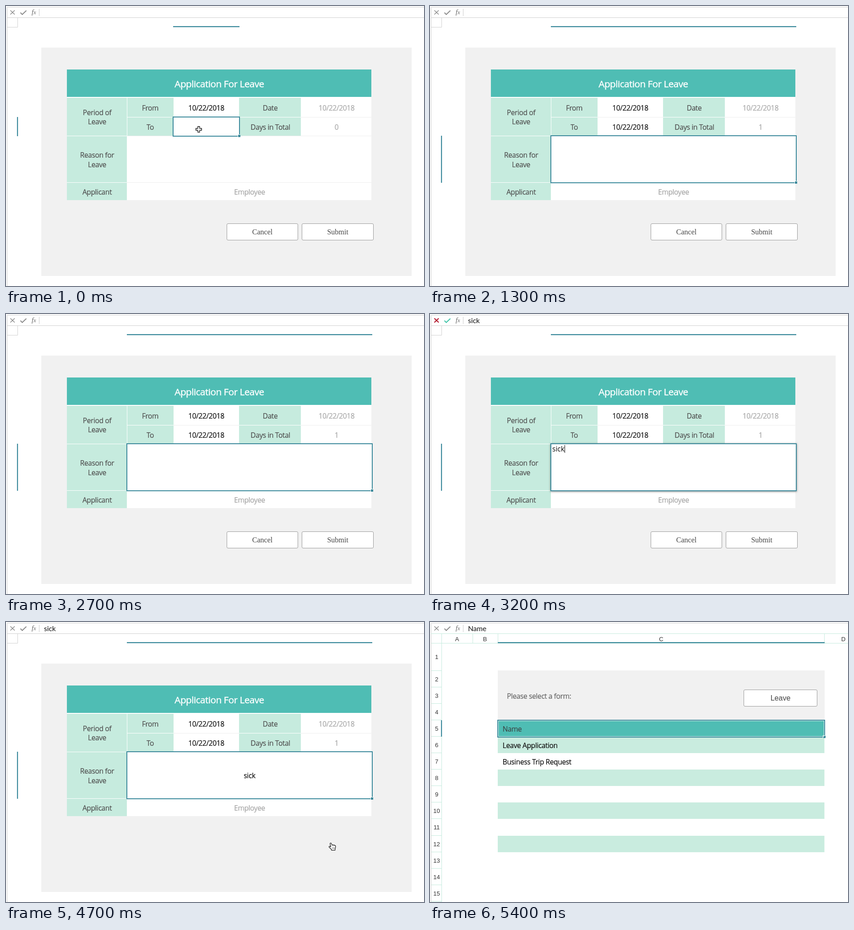
Animation, 913 px wide and 613 px high, one loop 5.5 s. Source, as an HTML page:

```html
<!DOCTYPE html>
<html lang="en">
<head>
<meta charset="utf-8">
<title>Leave form</title>
<style>
  html, body { margin: 0; width: 100%; height: 100%; overflow: hidden; background: #fff; }
  svg { display: block; width: 913px; height: 613px; }
  text { white-space: pre; }
  .cell { font: 15.5px "Open Sans", sans-serif; letter-spacing: -.025em; stroke: currentColor; stroke-width: .2px; }
  .title { font: 20.7px "Open Sans", sans-serif; letter-spacing: -.025em; stroke: currentColor; stroke-width: .4px; }
  .edit { font: 15.5px "Open Sans", sans-serif; }
  .bar { font: 15.5px Lato, sans-serif; }
  .head { font: 13px "Liberation Sans", Arial, sans-serif; }
  .sans { font: 16px "Liberation Sans", Arial, sans-serif; }
  .serif { font: 16px "Liberation Serif", Times, serif; }
  .fx { font: italic 15px "Liberation Serif", Times, serif; }
  .editing { filter: drop-shadow(0 1px 2px rgba(0, 0, 0, .45)); }
</style>
</head>
<body>
<svg id="stage" viewBox="0 0 913 613"></svg>
<script>
const LOOP = 5500;
const TEAL = '#4fbdb4', MINT = '#c6ebde', PANEL = '#f1f1f1', SELECT = '#3c8a9c', LABEL = '#505050', MUTED = '#a6a6a6';
const stage = document.getElementById('stage');

// Rectangles are given by their edges.
const box = (x1, y1, x2, y2, fill, extra = '') =>
  `<rect x="${x1}" y="${y1}" width="${x2 - x1}" height="${y2 - y1}" fill="${fill}" ${extra}/>`;
const path = (d, stroke, width = 1, fill = 'none', extra = '') =>
  `<path d="${d}" stroke="${stroke}" stroke-width="${width}" fill="${fill}" ${extra}/>`;
const text = (str, x, y, kind = 'cell', color = LABEL, anchor = 'middle', id = '') =>
  `<text x="${x}" y="${y}" class="${kind}" fill="${color}" color="${color}" text-anchor="${anchor}" ${id && `id="${id}"`}>${str}</text>`;
const button = (label, x1, y1, x2, y2, kind) =>
  box(x1 + .5, y1 + .5, x2 - .5, y2 - .5, '#fff', 'rx="2.5" stroke="#9a9a9a"') +
  text(label, (x1 + x2) / 2, (y1 + y2) / 2 + 5, kind, '#444');

function selection(x1, y1, x2, y2, editing, fill = '#fff') {
  const frame = box(x1, y1, x2, y2, fill, `stroke="${SELECT}" stroke-width="2" ${editing ? 'class="editing"' : ''}`);
  const handle = box(x2 - 4, y2 - 4, x2 + 2, y2 + 2, '#fff') + box(x2 - 3, y2 - 3, x2 + 2, y2 + 2, SELECT);
  return frame + (editing ? '' : handle);
}

// Markers along the column and row headers.
const markers = (x1, y1, x2, y2) => box(x1, 44, x2, 46.3, SELECT) + box(24, y1, 26.2, y2, SELECT);

const formulaBar = (content, editing, line) =>
  path('M2.5 613V3.5', '#cfcfcf') + path('M2 2.5H913', '#d2d2d2') + path('M2 25.5H913', line) +
  path('M9.5 9.5l9.5 9M19 9.5l-9.5 9', editing ? '#b01028' : '#8c8c8c', editing ? 2 : 1.6) +
  path('M31.5 14.5l4 4 9-8.5', editing ? '#3fc4a8' : '#8c8c8c', 2) +
  text('f<tspan font-size="12">x</tspan>', 56, 18, 'fx', '#666', 'start') +
  path('M72.5 6V22', '#ccc') + text(content, 83, 19.5, 'bar', '#111', 'start');

const plus = (x, y) =>
  path('M-2-6.3h4v4.3h4.3v4h-4.3v4.3h-4v-4.3h-4.3v-4h4.3z', '#222', 1.4, '#fff', `transform="translate(${x} ${y})"`);
const hand = (x, y) => `<g transform="translate(${x} ${y})">` +
  path('M-4-6c-1-2 1.6-3 2.6-1.2l2 4.2c.3-1.6 2.4-1.6 2.8 0 .6-1.2 2.4-.8 2.6.4 1-.6 1.8.2 1.8 1.2 0 2.6.2 4-1 6v3H-1.2V5.8L-6 1.2c-1.4-1.8.6-3 2-1.8l1.4 1z', '#222', 1.3, '#fff', 'stroke-linejoin="round"') +
  path('M1 1.5v3M3 1.5v3M5 1.5v3', '#444', .8) + '</g>';

function leaveForm(t) {
  const dated = t >= 1300, edit2 = t >= 2900 && t < 3600, reason = t >= 3600;
  const edit1 = t >= 300 && !dated;
  const formula = '=today()'.slice(0, Math.max(0, Math.floor((t - 300) / 100)));
  const word = 'sick'.slice(0, Math.max(0, Math.floor((t - 2800) / 100)));
  const typed = edit1 ? formula : word;
  const area = dated ? [264, 284, 800, 387] : [365, 243, 510, 285];
  const mintCells = [[133, 201, 264, 284], [133, 285, 264, 386], [133, 387, 264, 425],
    [265, 201, 366, 243], [265, 244, 366, 284], [509, 201, 644, 243], [509, 244, 644, 284]];
  const value = (str, x, y, color = '#111') => text(str, x, y, 'cell', color);

  let out = formulaBar(typed, edit1 || edit2, '#cfcfcf') + path('M3 46.5H25.5V26', '#d2d2d2') +
    markers(...area) +
    box(77, 91, 886, 591, PANEL) + box(133, 139, 798, 425, '#fff') + box(133, 139, 798, 199, TEAL) +
    mintCells.map(c => box(...c, MINT)).join('') +
    path('M366 243.5H509M644 243.5H798M264 284.5H798M264 386.5H798', '#eee') +
    text('Application For Leave', 466, 178, 'title', '#fff') +
    text('Period of', 199, 238.5) + text('Leave', 199, 259) +
    text('Reason for', 199, 332) + text('Leave', 199, 352.5) + text('Applicant', 199, 412.5) +
    text('From', 315, 228.5) + text('To', 315, 270.5) + text('Date', 577, 228.5) + text('Days in Total', 577.5, 270.5) +
    value('10/22/2018', 437.5, 228.5) + value('10/22/2018', 722, 228.5, MUTED) +
    value(dated ? 1 : 0, 722, 270.5, MUTED) + value('Employee', 532, 412.5, MUTED);

  if (dated) out += value('10/22/2018', 437.5, 270.5);
  if (t < 4600) out += button('Cancel', 482, 476, 638, 513, 'serif') + button('Submit', 646, 476, 803, 513, 'serif');
  out += selection(...area, edit1 || edit2);
  if (edit1 || edit2) out += text(typed, area[0] + (edit1 ? 4 : 3), area[1] + 17, 'edit', '#111', 'start', 'typed');
  if (reason) out += value('sick', 532, 341.5);

  if (t < 100) out += plus(421, 270);
  if (t >= 4200) {
    const p = Math.min(1, (t - 4200) / 300), ease = p * (2 - p);
    const x = 640 + 72 * ease, y = 440 + 52 * ease;
    out += x > 646 && y > 476 ? hand(x, y) : plus(x, y);
  }
  return out;
}

function formList(t) {
  const rowEdge = row => row < 2 ? 46 + 60 * (row - 1) : 106.5 + 36.1 * (row - 2);
  let out = formulaBar('Name', false, MINT) +
    path('M3 46.5H913M25.5 26V613M93.5 26V46M148.5 26V46M861.5 26V46', MINT) +
    [['A', 59], ['B', 120], ['C', 505], ['D', 903]].map(([s, x]) => text(s, x, 41.5, 'head', '#333')).join('');
  for (let row = 1; row <= 15; row++) {
    const bottom = Math.round(rowEdge(row + 1));
    out += path(`M3 ${bottom - .5}H26`, MINT) +
      text(row, 14.5, Math.round((rowEdge(row) + rowEdge(row + 1)) / 2) + 4.5, 'head', '#333');
    if (row >= 6 && row <= 12 && row % 2 === 0) out += box(148, bottom - 36, 861.5, bottom, '#c9ecdf');
  }
  out += markers(148, 215, 862, 251) + box(148, 106, 862, 215, PANEL) +
    text('Please select a form:', 168, 167.5, 'cell', '#666', 'start') +
    button('Leave', 685, 148, 846, 185, 'sans') +
    selection(148, 215, 862, 252, false, TEAL) +
    box(149.5, 216.5, 860.5, 250.5, 'none', 'stroke="#d9f1ec"') +
    text('Name', 158.5, 239.5, 'cell', '#3c4a4a', 'start') +
    text('Leave Application', 158.5, 275.5, 'cell', '#111', 'start') +
    text('Business Trip Request', 158.5, 311.5, 'cell', '#111', 'start');
  return out + (t < 5300 ? plus(709.5, 483) : '');
}

let shown = '';
function draw(now) {
  const t = Math.floor((now % LOOP) / 100) * 100;
  const picture = t < 4800 ? leaveForm(t) : formList(t);
  if (picture !== shown) {
    stage.innerHTML = shown = picture;
    const typed = document.getElementById('typed');
    if (typed) {
      const x = +typed.getAttribute('x') + (typed.textContent ? typed.getComputedTextLength() : 0) + .5;
      const y = +typed.getAttribute('y');
      stage.insertAdjacentHTML('beforeend', path(`M${x} ${y - 14}V${y + 3}`, '#000'));
    }
  }
  requestAnimationFrame(draw);
}
draw(performance.now());
</script>
</body>
</html>
```
